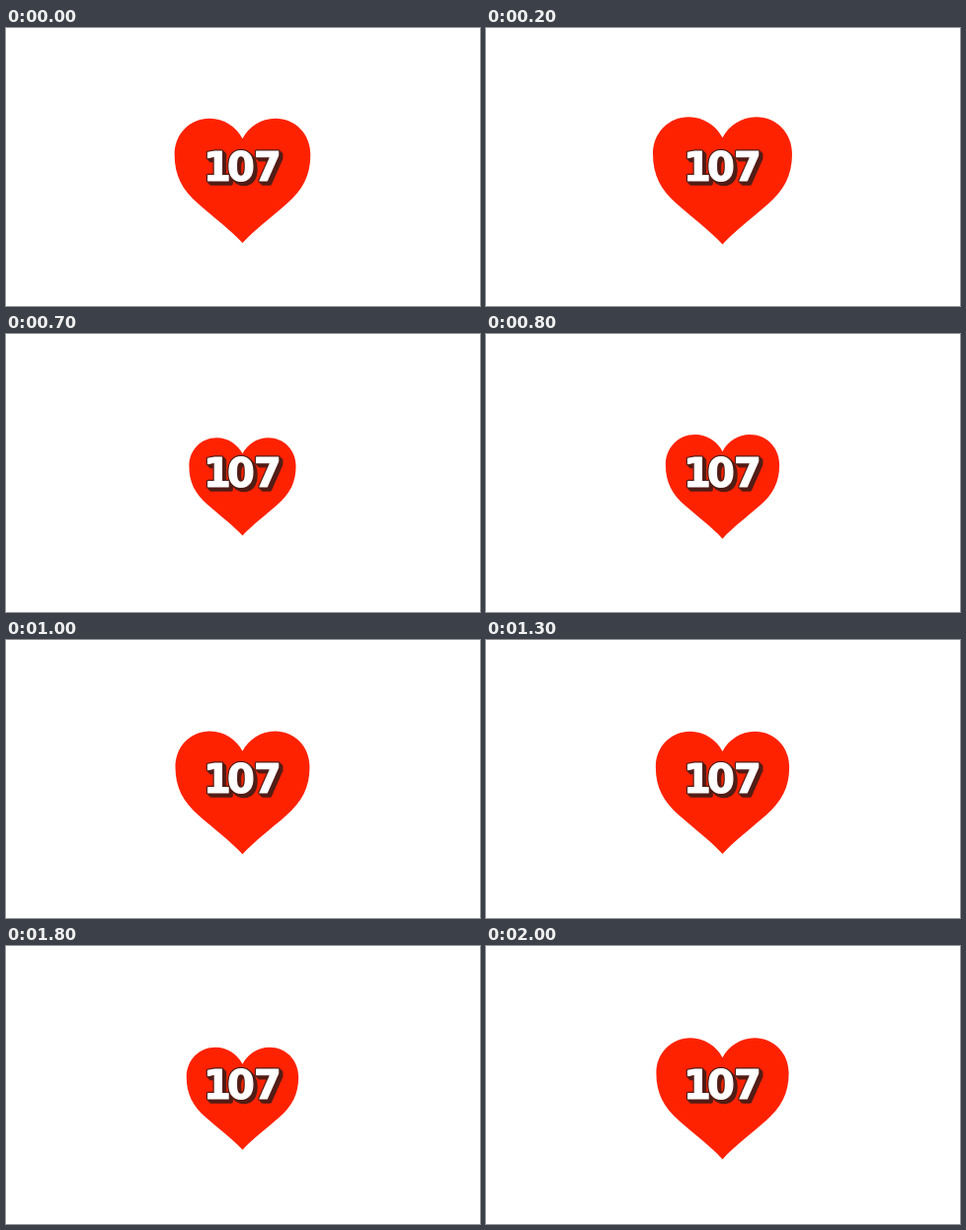
An HTML page that plays this animation: 480 by 282 pixels, repeating every 2100 ms.

```html
<!DOCTYPE html>
<html lang="en">
<head>
<meta charset="utf-8">
<title>Heart counter</title>
<style>
  html, body { margin: 0; width: 100%; height: 100%; overflow: hidden; background: #fff; }
  svg { display: block; width: 480px; height: 282px; }
  text { font: bold 40px "DejaVu Sans", Verdana, sans-serif; stroke-linejoin: round; }
  .edge text { fill: #521d16; stroke: #521d16; stroke-width: 3.6px; }
  .face { fill: #fff; stroke: #fff; stroke-width: 1.2px; }
</style>
</head>
<body>
<svg viewBox="0 0 480 282">
  <path id="heart" fill="#ff2200" d="M0-42C6-54 19-62.5 33-62.5C53-62.5 68.5-47 68.5-26
    C68.5-5 60.7 9.5 44.6 23.6C28.7 37.6 12.6 49.6 0 63.2C-12.6 49.6-28.7 37.6-44.6 23.6
    C-60.7 9.5-68.5-5-68.5-26C-68.5-47-53-62.5-33-62.5C-19-62.5-6-54 0-42Z"/>
  <g class="edge" id="edge"></g>
  <text class="face" id="face" x="200 224 251" y="155">107</text>
</svg>
<script>
  const LOOP = 2100, STEP = 100;
  const BEAT = 1020, PEAK = 126;      // pulse period and time of largest size, ms
  const MEAN = 124.8, SWING = 18;     // heart width, px
  const heart = document.getElementById("heart");
  const face = document.getElementById("face");
  const edge = document.getElementById("edge");

  // Stacked copies give the digits their slanted depth.
  for (let d = 3; d >= 0; d--) {
    const layer = face.cloneNode(true);
    layer.removeAttribute("id");
    layer.removeAttribute("class");
    layer.setAttribute("transform", `translate(${d} ${d})`);
    edge.append(layer);
  }

  function draw(ms) {
    const t = Math.floor((ms % LOOP) / STEP) * STEP;
    const width = MEAN + SWING * Math.cos(2 * Math.PI * (t - PEAK) / BEAT);
    heart.setAttribute("transform", `translate(239.5 154.5) scale(${width / 137})`);
  }

  const start = performance.now();
  function tick() {
    draw(performance.now() - start);
    requestAnimationFrame(tick);
  }
  tick();
</script>
</body>
</html>
```
